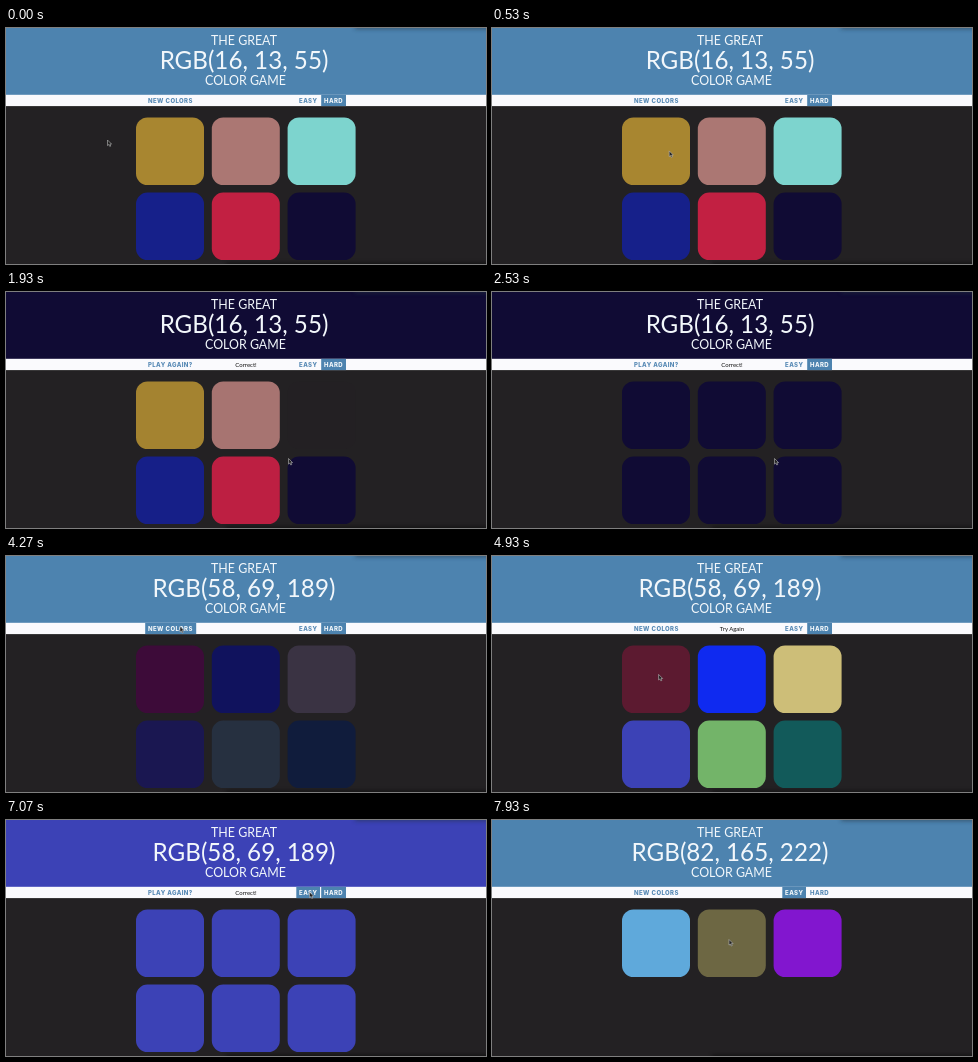
Recreate the animation shown at these times as an HTML page. Size 480 px wide and 236 px high, loop 8000 ms.

```html
<!DOCTYPE html>
<html lang="en">
<head>
<meta charset="utf-8">
<title>Color Game</title>
<style>
  html, body { margin: 0; width: 100%; height: 100%; overflow: hidden; background: #232123; }
  svg { display: block; width: 480px; height: 236px; }
  text { font-family: Lato, sans-serif; text-anchor: middle; }
  .title { fill: #f2f7fb; font-size: 12.4px; }
  #goal { font-size: 24.2px; }
  #message { font-size: 6px; fill: #111; }
  .button text { font: 800 6px Inter, sans-serif; letter-spacing: .4px; text-anchor: start; fill: #5588b4; }
  .button rect { fill: none; }
  .button.on rect { fill: #4d83af; }
  .button.on text { fill: #f4f8fb; }
</style>
</head>
<body>
<svg viewBox="0 0 480 236">
  <defs>
    <filter id="soft" x="-10%" y="-300%" width="120%" height="700%"><feGaussianBlur stdDeviation="2"/></filter>
  </defs>
  <rect width="480" height="236" fill="#232123"/>
  <rect id="header" width="480" height="67"/>
  <rect x="349" y="-5" width="140" height="6" fill="#203040" opacity=".55" filter="url(#soft)"/>
  <rect x="220" y="235" width="270" height="5" opacity=".5" filter="url(#soft)"/>
  <text class="title" x="238" y="17">THE GREAT</text>
  <text class="title" x="238" y="40.7" id="goal"></text>
  <text class="title" x="239.5" y="56.8">COLOR GAME</text>
  <rect y="66.8" width="480" height="11.3" fill="#fafafd"/>
  <g id="buttons"></g>
  <text id="message" x="240" y="74.8"></text>
  <g id="squares"></g>
  <path id="cursor" d="M0 0V5.6L1.3 4.5L2.3 6.5L3.2 6.1L2.4 4.1H4.1Z" fill="#222" stroke="#bbb" stroke-width=".6"/>
</svg>
<script>
const LOOP = 8000, FADE = 600, HOLD = 270;
const $ = id => document.getElementById(id);
const BACK = '#232123', STEEL = '#4d83af';

// The colors of each round, with the winning one's index
const rounds = [
  { goal: '16, 13, 55', win: 5, colors: ['#a88630', '#ab7773', '#7dd4ce', '#16208a', '#c22042', '#100b34'] },
  { goal: '58, 69, 189', win: 3, colors: ['#dc0a4c', '#0f2af0', '#cdbe78', '#3c42b6', '#73b469', '#125a5a'] },
  { goal: '82, 165, 222', win: 0, colors: ['#5fa9db', '#6d6743', '#8216cf'] }
];

// The player's clicks; "miss" names a square
const clicks = [
  { at: 0, x: 101.5, y: 112 },
  { at: 1010, x: 295.5, y: 140, miss: 2 },
  { at: 1860, x: 282.5, y: 166.5, won: true },
  { at: 4125, x: 174, y: 70.5, next: true },
  { at: 4640, x: 166, y: 118, miss: 0 },
  { at: 5430, x: 242, y: 171.5, won: true },
  { at: 7135, x: 303.5, y: 72, next: true },
  { at: 8060, x: 237, y: 119.5 }
];

const mix = (a, b, p) => a + (b - a) * p;
const clamp = p => Math.min(1, Math.max(0, p));
const smooth = p => p * p * (3 - 2 * p);
const channels = hex => [1, 3, 5].map(k => parseInt(hex.slice(k, k + 2), 16));

// CSS "ease" timing curve, solved by bisection
function ease(x) {
  let lo = 0, hi = 1, s;
  for (let i = 0; i < 20; i++) {
    s = (lo + hi) / 2;
    if (.75 * s * (1 - s) + s ** 3 < x) lo = s; else hi = s;
  }
  return .3 * s * (1 - s) ** 2 + 3 * s * s * (1 - s) + s ** 3;
}

// Replays the game's rules up to time t
function gameAt(t) {
  let n = 0, colors = rounds[0].colors.map(channels);
  let state = { header: STEEL, label: 'NEW COLORS', message: '' };
  for (const { at, miss, won, next } of clicks) {
    if (at > t) break;
    if (next) n++;
    const round = rounds[n], winner = round.colors[round.win];
    if (miss >= 0) state.message = 'Try Again';
    if (won) state = { header: winner, label: 'PLAY AGAIN?', message: 'Correct!' };
    if (next) state = { header: STEEL, label: 'NEW COLORS', message: '' };

    const p = ease(clamp((t - at - 45) / FADE));
    colors = colors.map((c, i) => {
      const to = won ? winner : next ? round.colors[i] : i === miss && BACK;
      return to ? channels(to).map((v, k) => mix(c[k], v, p)) : c;
    });
  }
  return { ...state, colors, ...{ goal: rounds[n].goal, count: rounds[n].colors.length } };
}

// Rest after a click, then arrive a little before the next one
function cursorAt(t) {
  const i = clicks.findIndex(c => c.at > t), a = clicks[i - 1], b = clicks[i];
  const start = Math.max(a.at + HOLD, b.at - 1000), end = b.at - 130;
  const p = smooth(clamp((t - start) / (end - start)));
  return [mix(a.x, b.x, p), mix(a.y, b.y, p)];
}

function add(parent, name, attrs) {
  const node = document.createElementNS('http://www.w3.org/2000/svg', name);
  for (const k in attrs) node.setAttribute(k, attrs[k]);
  return parent.appendChild(node);
}

function button(x, width, label) {
  const g = add($('buttons'), 'g', { class: 'button' });
  add(g, 'rect', { x, y: 66.8, width, height: 11.3 });
  const text = add(g, 'text', { x: x + 2.8, y: 74.8 });
  return {
    set(on, mouse, name = label) {
      const over = mouse[0] > x && mouse[0] < x + width && mouse[1] > 67 && mouse[1] < 78;
      g.classList.toggle('on', on || over);
      text.textContent = name;
    }
  };
}

const reset = button(139.2, 51);
const easy = button(290.3, 23.7, 'EASY');
const hard = button(315.2, 24.8, 'HARD');
const squares = rounds[0].colors.map((_, i) => add($('squares'), 'rect', {
  x: 130 + i % 3 * 75.8, y: 89.5 + Math.floor(i / 3) * 75.1, width: 68, height: 67.5, rx: 11.5
}));

function draw(t) {
  const game = gameAt(t), mouse = cursorAt(t), isEasy = game.count === 3;
  $('header').setAttribute('fill', game.header);
  $('goal').textContent = `RGB(${game.goal})`;
  $('message').textContent = game.message;
  reset.set(false, mouse, game.label);
  easy.set(isEasy, mouse);
  hard.set(!isEasy, mouse);
  $('cursor').setAttribute('transform', `translate(${mouse})`);
  squares.forEach((r, i) => {
    r.setAttribute('fill', `rgb(${game.colors[i].map(Math.round)})`);
    r.setAttribute('visibility', i < game.count ? 'visible' : 'hidden');
  });
}

let begin;
function tick(now) {
  begin ??= now;
  draw((now - begin) % LOOP);
  requestAnimationFrame(tick);
}
draw(0);
requestAnimationFrame(tick);
</script>
</body>
</html>
```
